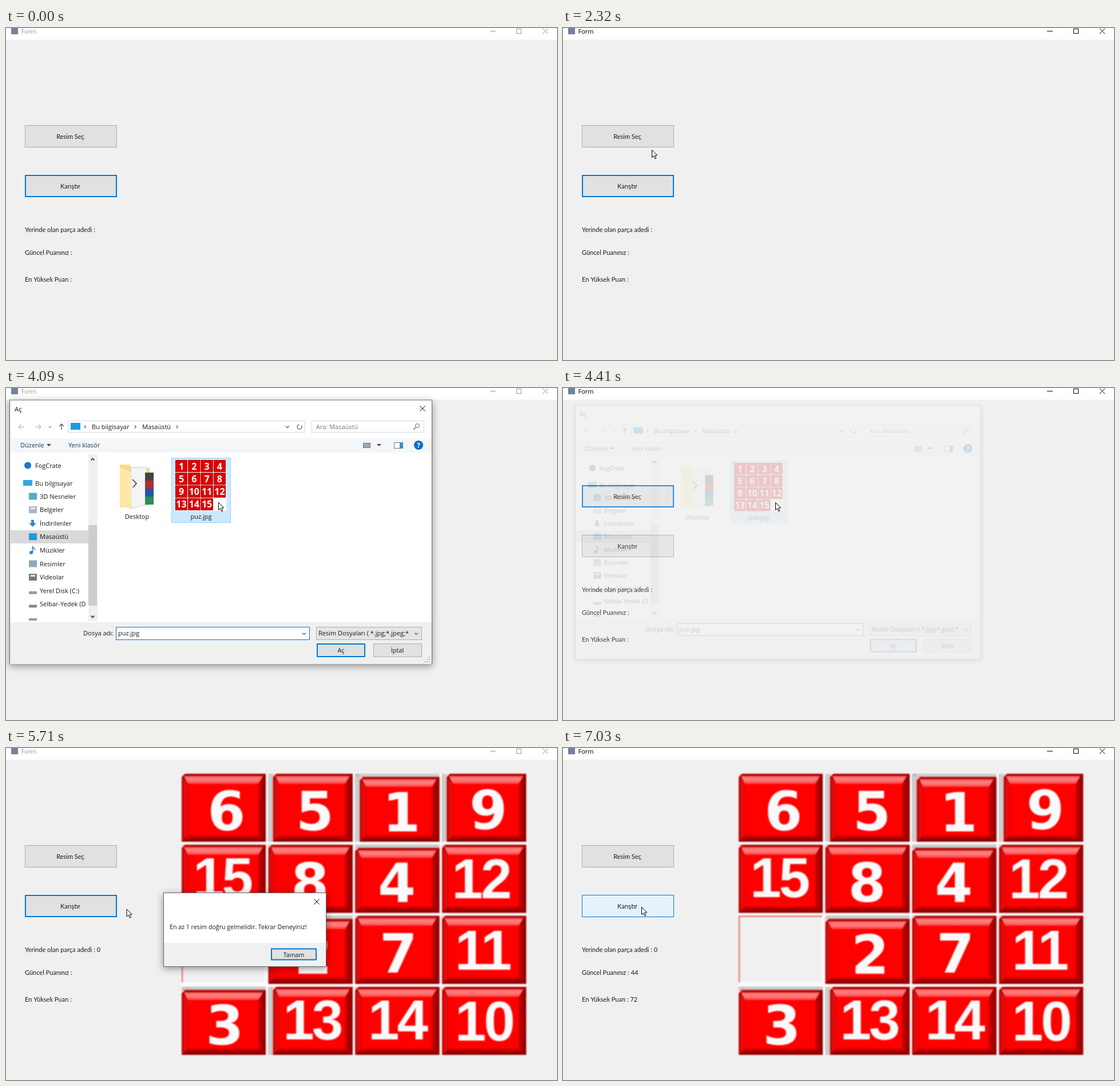
An HTML page with a canvas that plays this animation: 963x581 px, repeating every 8000 ms.

```html
<!DOCTYPE html>
<html lang="tr">
<head>
<meta charset="utf-8">
<title>Form</title>
<style>
html, body { margin: 0; width: 100%; height: 100%; overflow: hidden; background: #f0f0f0; }
canvas { display: block; }
</style>
</head>
<body>
<canvas id="stage" width="963" height="581"></canvas>
<script>
const W = 963, H = 581, LOOP = 8000, STEP = 77.3;
const BLUE = '#0078d7', INK = '#1a1a1a', FACE = '#f0f0f0';
const UI = '"Open Sans", "Noto Sans", sans-serif';
const LABEL = 'Lato, sans-serif';

const newLayer = () => Object.assign(document.createElement('canvas'), { width: W, height: H }).getContext('2d');
const screen = document.getElementById('stage').getContext('2d');
const layer = newLayer();
let c = screen;

// Runs draw() with another context as the current one.
function drawOn(context, draw) {
  const previous = c;
  c = context;
  draw();
  c = previous;
}

// ---------- drawing helpers ----------
function box(x, y, w, h, fill, border, line = 1) {
  c.fillStyle = fill;
  c.fillRect(x, y, w, h);
  if (!border) return;
  c.strokeStyle = border;
  c.lineWidth = line;
  c.strokeRect(x + line / 2, y + line / 2, w - line, h - line);
}

function trace(points) {
  c.beginPath();
  points.forEach(([x, y], i) => i ? c.lineTo(x, y) : c.moveTo(x, y));
}

function poly(points, fill, stroke, line = 1) {
  trace(points);
  c.closePath();
  if (fill) { c.fillStyle = fill; c.fill(); }
  if (stroke) { c.strokeStyle = stroke; c.lineWidth = line; c.stroke(); }
}

function path(points, color, line = 1) {
  trace(points);
  c.strokeStyle = color;
  c.lineWidth = line;
  c.stroke();
}

function gradient(x0, y0, x1, y1, ...colors) {
  const g = c.createLinearGradient(x0, y0, x1, y1);
  colors.forEach((color, i) => g.addColorStop(i / (colors.length - 1), color));
  return g;
}

function disc(x, y, r, fill) {
  c.beginPath();
  c.arc(x, y, r, 0, Math.PI * 2);
  c.fillStyle = fill;
  c.fill();
}

function text(str, x, y, font, color = INK, align = 'left') {
  c.font = font;
  c.fillStyle = color;
  c.textAlign = align;
  c.fillText(str, x, y);
}

const ui = (str, x, y, color = INK, align = 'left') => text(str, x, y, '11px ' + UI, color, align);

function cross(x, y, r, color) {
  path([[x - r, y - r], [x + r, y + r]], color);
  path([[x - r, y + r], [x + r, y - r]], color);
}

// Chevron pointing along (dx, dy).
function chevron(x, y, dx, dy, r = 3, color = '#666', line = 1.3) {
  const px = x + dx * r / 2, py = y + dy * r / 2;
  path([[px - dx * r - dy * r, py - dy * r - dx * r], [px, py],
        [px - dx * r + dy * r, py - dy * r + dx * r]], color, line);
}

function arrow(x, y, dx, dy, color) {
  path([[x - dx * 5, y - dy * 5], [x + dx * 5, y + dy * 5]], color, 1.3);
  chevron(x + dx * 3, y + dy * 3, dx, dy, 4, color);
}

// ---------- timeline, counted in screen refreshes ----------
const within = (n, from, to) => n >= from && n < to;

const modal = n => within(n, 17, 24) || within(n, 36, 54) || within(n, 67, 78) || within(n, 80, 85);
const isActive = n => n >= 16 && !modal(n);

const cursorKeys = [
  [1, 745, 565], [3, 239, 203], [5, 239, 203], [10, 150, 274], [27, 150, 274],
  [30, 155, 213], [32, 152, 187], [39, 152, 187], [44, 425, 217], [49, 425, 217],
  [51, 371, 200], [57, 371, 200], [63, 180, 283], [72, 180, 283], [76, 241, 280],
  [88, 241, 280], [91, 137, 278]
];

function cursorAt(n) {
  if (n < 1) return null;
  const i = cursorKeys.findIndex(k => k[0] > n);
  if (i < 0) return cursorKeys[cursorKeys.length - 1].slice(1);
  const [t0, x0, y0] = cursorKeys[i - 1], [t1, x1, y1] = cursorKeys[i];
  const u = (n - t0) / (t1 - t0), e = u * u * (3 - 2 * u);
  return [x0 + (x1 - x0) * e, y0 + (y1 - y0) * e];
}

// Opening windows grow and fade in, closing ones shrink and fade out.
function popup(n, open, openLen, close, closeLen, cx, cy, draw) {
  if (n < open) return;
  let alpha, scale;
  if (n < close) {
    const k = Math.min(1, (n - open + 1) / openLen);
    alpha = 1 - (1 - k) ** 3;
    scale = 0.92 + 0.08 * alpha;
  } else {
    const q = (n - close + 1) / closeLen;
    if (q >= 1) return;
    alpha = 1 - q;
    scale = 1 - 0.047 * q;
  }
  layer.clearRect(0, 0, W, H);
  drawOn(layer, draw);
  c.save();
  c.globalAlpha = alpha;
  c.translate(cx, cy);
  c.scale(scale, scale);
  c.drawImage(layer.canvas, -cx, -cy);
  c.restore();
}

function windowFrame(x, y, w, h) {
  c.save();
  c.shadowColor = 'rgba(0,0,0,.4)';
  c.shadowBlur = 12;
  c.shadowOffsetY = 3;
  box(x, y, w, h, '#fff');
  c.restore();
  box(x, y, w, h, '#fff', '#666');
}

// ---------- main form ----------
function titleBar(active) {
  const color = active ? '#000' : '#999';
  box(0, 0, W, 20.5, '#fff');
  box(9, 0, 12, 11, '#71829f');
  text('Form', 26.5, 9.5, '11px ' + UI, color);
  path([[846, 5.5], [856, 5.5]], color);
  c.strokeRect(892.5, 1.5, 8, 8);
  cross(942.5, 5.5, 4.7, color);
}

function button(label, y, focused, hover) {
  const fill = hover ? '#e5f1fb' : '#e1e1e1';
  const border = hover || focused ? BLUE : '#adadad';
  box(33, y, 161, 39, fill, border, focused && !hover ? 2 : 1);
  text(label, 112.5, y + 24, '11px ' + LABEL, INK, 'center');
}

function form(n, cursor) {
  box(0, 0, W, H, FACE);
  titleBar(isActive(n));
  const over = y => cursor && !modal(n) && cursor[0] > 33 && cursor[0] < 194 &&
                    cursor[1] > y && cursor[1] < y + 39;
  const pickFocused = within(n, 35, 66);
  button('Resim Seç', 170, pickFocused, over(170));
  button('Karıştır', 257, !pickFocused, over(257));
  const placed = n >= 66 ? ' 0' : '';
  const score = n >= 86 ? ' 44' : n >= 79 ? ' 52' : '';
  const best = n >= 79 ? ' 72' : '';
  [['Yerinde olan parça adedi :' + placed, 357], ['Güncel Puanınız :' + score, 397],
   ['En Yüksek Puan :' + best, 444]].forEach(([s, y]) => text(s, 33, y, '11px ' + LABEL));
}

// ---------- puzzle board ----------
const order = [6, 5, 1, 9, 15, 8, 4, 12, 0, 2, 7, 11, 3, 13, 14, 10];

function bevel(l, t, r, b) {
  const il = l + 11, it = t + 18, ir = r - 13, ib = b - 11;
  box(l, t, r - l, b - t, '#b40000');
  poly([[l + 4, t + 4], [r - 5, t + 4], [ir, it], [il, it]],
       gradient(0, t + 3, 0, it, '#e84848', '#ff8080', '#ff7070', '#ff3030'));
  poly([[l, t + 4], [il, it], [il, ib], [l, b]], gradient(l, 0, il, 0, '#b80000', '#e01010', '#f00000'));
  poly([[r, t], [r, b], [ir, ib], [ir, it]], gradient(ir, 0, r, 0, '#d00000', '#a80000', '#8c0000'));
  poly([[l, b], [r, b], [ir, ib], [il, ib]], gradient(0, ib, 0, b, '#d80000', '#a40000', '#840000'));
  box(il, it, ir - il, ib - it, '#fe0000');
  poly([[l, t], [l + 6, t], [l, t + 6]], '#ffd0d0');
}

function tile(n, x, y, w, h) {
  const col = (n - 1) % 4, row = Math.floor((n - 1) / 4);
  const left = col === 0 ? 8 : 0, top = row === 0 ? 5.5 : 0;
  box(x, y, w, h, '#e6e6e6');
  if (left) for (const d of [1, 5]) path([[x + d, y], [x + d, y + h]], '#a2a2a2', 1.5);
  if (top) for (const d of [1, 4]) path([[x, y + d], [x + w, y + d]], '#a2a2a2', 1.2);
  bevel(x + left, y + top, x + w, y + h);

  const cx = x + 81 - 2.8 * col, base = y + 101 - 1.8 * row;
  if (n < 10) return text(String(n), cx, base, 'bold 95px "DejaVu Sans", sans-serif', '#fafafa', 'center');
  c.letterSpacing = '-4px';
  text(String(n), cx - 5, base - 3.5, 'bold 98px "Liberation Sans", sans-serif', '#fafafa', 'center');
  c.letterSpacing = '0px';
}

function paintBoard() {
  box(306, 44, 604, 493, '#fbf8f8');
  order.forEach((n, i) => {
    const x = 307 + (i % 4) * 151.7, y = 45 + Math.floor(i / 4) * 124.3;
    if (n) return tile(n, x, y, 147, 119);
    box(x, y, 147, 119, FACE);
    path([[x + 146, y], [x + 146, y + 118], [x, y + 118]], '#fff', 2);
    path([[x + 1, y + 117], [x + 1, y + 1], [x + 146, y + 1]], '#d83a3a', 1.5);
  });
}

const boardLayer = newLayer();
drawOn(boardLayer, paintBoard);

// The enlarged picture looks slightly soft.
function board() {
  c.save();
  c.filter = 'blur(0.9px)';
  c.drawImage(boardLayer.canvas, 0, 0);
  c.restore();
}

// ---------- message box ----------
function message(str, x, w) {
  const r = x + w;
  windowFrame(x, 253, w, 130);
  box(x + 1, 341, w - 2, 41, FACE);
  cross(r - 17, 269, 4.7, '#000');
  text(str, x + 11, 317, '10.6px ' + UI);
  box(r - 97, 350.5, 80, 21, '#e1e1e1', BLUE, 2);
  text('Tamam', r - 57, 365.5, '10.6px ' + UI, INK, 'center');
}

// ---------- file dialog ----------
const places = [
  ['3D Nesneler', '#5ba7c9'], ['Belgeler', '#a9b6bf'], ['İndirilenler', '#2f86d6'],
  ['Masaüstü', '#1e9be0'], ['Müzikler', '#2f86d6'], ['Resimler', '#8fa9b5'],
  ['Videolar', '#707a82'], ['Yerel Disk (C:)', '#9a9a9a'], ['Selbar-Yedek (D', '#8a8a8a']
];

function scrollbar(top, height) {
  box(144, 116, 16, 292, FACE);
  box(144, top, 15, height, '#cdcdcd');
  chevron(151.5, 125, 0, -1, 3, '#505050', 2);
  chevron(151.5, 400, 0, 1, 3, '#505050', 2);
}

function skeleton() {
  box(17, 30, 12, 11, '#71829f');
  text('Aç', 34.5, 40, '11.5px ' + UI);
  scrollbar(132, 234);
  box(7, 408, 737, 75, FACE);
  box(134, 421, 53, 15, '#fff');
  box(192, 417, 339, 24, '#fff');
  box(543, 417, 185, 23, '#fff');
  box(543, 446, 86, 25, '#fff');
  box(641, 446, 87, 25, '#fff');
  box(728, 466, 16, 17, '#fff');
}

function addressRow() {
  arrow(27, 68, -1, 0, '#bbb');
  arrow(56, 68, 1, 0, '#bbb');
  chevron(77, 68, 0, 1, 2, '#999');
  arrow(97, 68, 0, -1, '#555');
  box(108, 57, 415, 21, '#fff', '#d9d9d9');
  box(113, 61, 17, 12, '#1e9be0');
  for (const x of [138, 226, 299]) chevron(x, 68, 1, 0, 2.5);
  ui('Bu bilgisayar', 150, 71.5);
  ui('Masaüstü', 238, 71.5);
  chevron(492, 68, 0, 1);
  c.beginPath();
  c.arc(513, 68, 4, -0.6, 4.6);
  c.stroke();
  box(534, 57, 197, 21, '#fff', '#d9d9d9');
  ui('Ara: Masaüstü', 542, 71.5, '#777');
  c.strokeStyle = '#666';
  c.beginPath();
  c.arc(719, 66, 3.5, 0, 7);
  c.stroke();
  path([[716, 69], [712, 73]], '#666', 1.5);
}

function toolbar() {
  box(7, 88, 737, 25, '#f5f6f7');
  ui('Düzenle', 25, 104, '#1e3960');
  poly([[71, 98], [79, 98], [75, 102]], '#444');
  ui('Yeni klasör', 109, 104, '#1e3960');
  box(624, 96, 13, 9, '#9ab', '#678');
  poly([[648, 98], [656, 98], [652, 102]], '#444');
  box(678, 95, 16, 11, '#fff', '#5b7f9b');
  box(688, 95, 6, 11, '#3f8fc9');
  disc(721, 100, 8, '#0a6fc2');
  text('?', 721, 104.5, 'bold 12px ' + UI, '#fff', 'center');
}

function navigation() {
  c.save();
  c.beginPath();
  c.rect(7, 113, 137, 295);
  c.clip();
  disc(38, 135.5, 6, '#1a76c8');
  ui('FogCrate', 51, 139.5);
  box(30, 161, 16, 10, '#35a5dc');
  ui('Bu bilgisayar', 51, 170.5);
  box(8, 249, 136, 23, '#d9d9d9');
  places.forEach(([name, color], i) => {
    const y = 189.5 + i * 23.6;
    if (i === 2) {
      poly([[44, y - 6], [49, y - 6], [49, y], [53, y], [46.5, y + 6], [40, y], [44, y]], color);
    } else if (i === 4) {
      disc(44, y + 4, 3, color);
      path([[46.5, y + 4], [46.5, y - 6], [51, y - 1]], color, 1.6);
    } else if (i > 6) {
      box(40, y + 1, 14, 5, color);
    } else {
      box(40, y - 6, 14, 12, color);
      if (i === 1 || i === 6) box(43, y - 4, 8, 3, '#eee');
    }
    ui(name, 59, y + 4);
  });
  box(40, 403, 14, 4, '#999');
  c.restore();
  scrollbar(240, 141);
}

function files(n) {
  poly([[199, 134], [215, 134], [220, 140], [251, 140], [251, 205], [199, 209]], '#f7dc83');
  poly([[218, 139], [246, 139], [246, 204], [218, 211]], '#f4f4f4', '#ccc');
  path([[221, 160], [228, 167], [222, 174]], '#333', 1.5);
  ['#444', '#b22b35', '#2454a8', '#2b8c55'].forEach((color, i) => box(243, 148 + i * 14, 15, 14, color));
  poly([[199, 139], [218, 147], [218, 211], [199, 206]], '#ffe9a2');
  ui('Desktop', 229, 229, INK, 'center');

  if (n >= 51) box(289, 122, 104, 114, n >= 53 ? '#cce8ff' : '#e5f3ff', n >= 53 ? '#99d1ff' : null);
  box(296, 126, 89, 89, '#fff');
  for (let i = 0; i < 15; i++) {
    const x = 296 + (i % 4) * 22.3, y = 126 + Math.floor(i / 4) * 22.3;
    box(x, y, 21, 21, '#e00000', '#a80000');
    text(String(i + 1), x + 10.5, y + 16.5, 'bold 16px ' + UI, '#fff', 'center');
  }
  ui('puz.jpg', 341, 229, INK, 'center');
}

function dialogFooter(n) {
  box(7, 410, 737, 73, FACE);
  ui('Dosya adı:', 188, 433, INK, 'right');
  box(192, 418, 339, 23, '#fff', n >= 53 ? BLUE : '#aaa');
  if (n >= 53) ui('puz.jpg', 196, 433);
  chevron(521, 430, 0, 1);
  box(542, 418, 185, 23, '#e5e5e5', '#adadad');
  c.save();
  c.beginPath();
  c.rect(542, 418, 163, 23);
  c.clip();
  ui('Resim Dosyaları ( *.jpg;*.jpeg;*.', 546, 433);
  c.restore();
  chevron(717, 430, 0, 1);
  box(543, 447, 85, 24, '#e1e1e1', BLUE, 2);
  ui('Aç', 585.5, 463, INK, 'center');
  box(642, 447, 85, 24, '#e1e1e1', '#adadad');
  ui('İptal', 684, 463, INK, 'center');
  for (let i = 0; i < 3; i++) for (let j = 0; j <= i; j++) box(739 - j * 4, 470 + i * 4, 2, 2, '#bbb');
}

function fileDialog(n) {
  windowFrame(6, 20.5, 739, 463);
  if (n < 54) cross(728, 36, 4.8, '#111');
  if (n < 45) return skeleton();
  text('Aç', 15, 41, '11.5px ' + UI);
  addressRow();
  toolbar();
  navigation();
  files(n);
  dialogFooter(n);
}

function pointer([x, y]) {
  const shape = [[0, 0], [0, 13], [3, 10.3], [5.3, 15.3], [7.3, 14.4], [5.2, 9.5], [9.3, 9.2]];
  poly(shape.map(([a, b]) => [x + 0.5 + a, y + 0.5 + b]), '#fff', '#000');
}

// ---------- scene ----------
function scene(n) {
  const cursor = cursorAt(n);
  const retry = 'En az 1 resim doğru gelmelidir. Tekrar Deneyiniz!';
  form(n, cursor);
  if (n >= 66) board();
  popup(n, 17, 5, 24, 3, 417, 318, () => message('Lütfen önce resim seçiniz!', 322, 190));
  popup(n, 38, 4, 54, 4.8, 375, 252.5, () => fileDialog(n));
  popup(n, 68, 4, 78, 2, 417, 318, () => message(retry, 275, 285));
  popup(n, 80, 6, 85, 4, 417, 318, () => message(retry, 275, 285));
  if (cursor) pointer(cursor);
}

const start = performance.now();
let shown = -1;

function tick() {
  const t = (performance.now() - start) % LOOP;
  const n = Math.min(91, Math.floor((t + 15) / STEP));
  if (n !== shown) scene(shown = n);
  requestAnimationFrame(tick);
}
tick();
</script>
</body>
</html>
```
